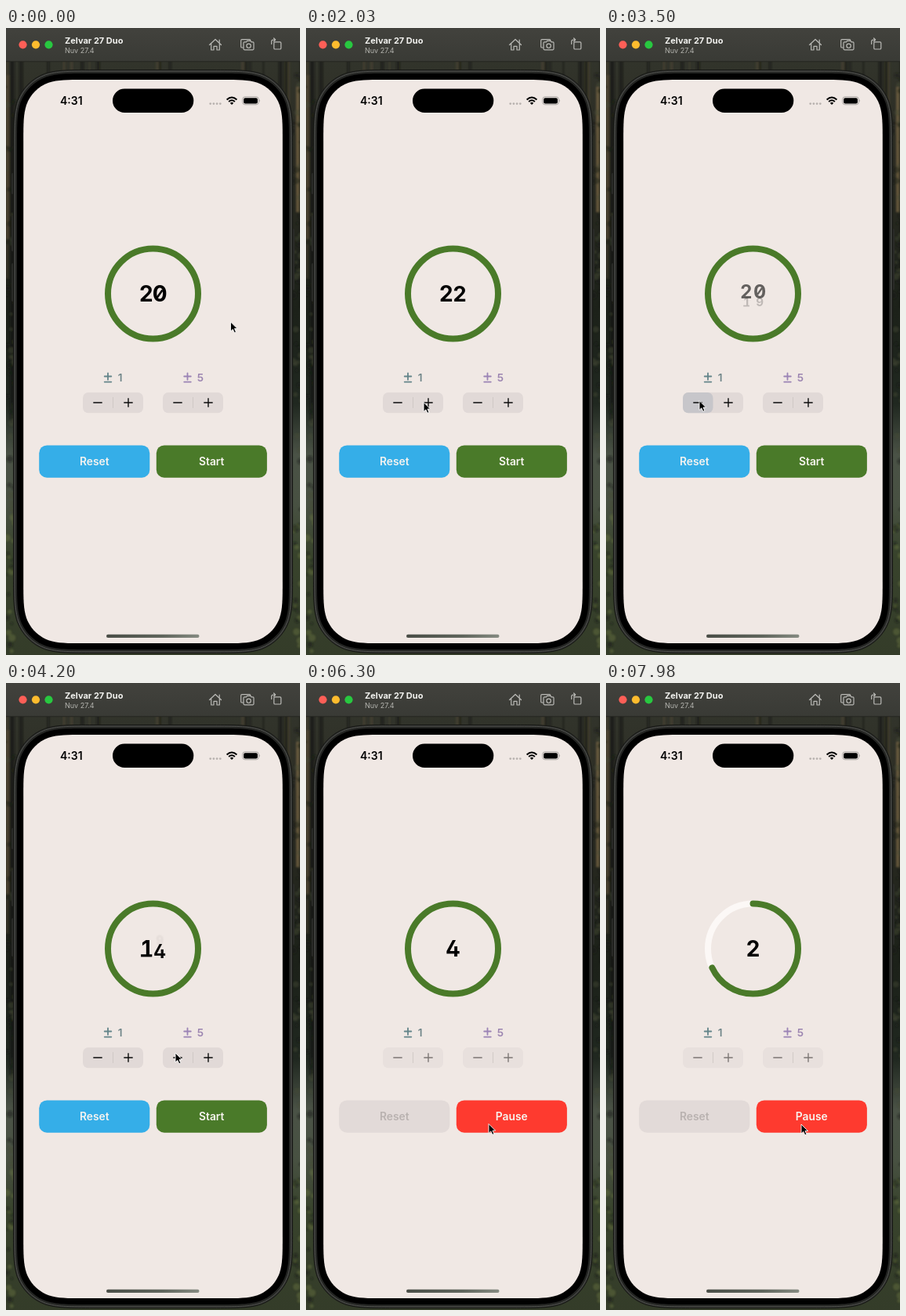
An HTML page that plays this animation: 375x800 px, repeating every 8 s.

```html
<!DOCTYPE html>
<html lang="en">
<head>
<meta charset="utf-8">
<title>Countdown</title>
<style>
  html, body { margin: 0; width: 100%; height: 100%; overflow: hidden; background: #24271c; }
  svg { display: block; width: 375px; height: 800px; }
  text { font-family: Inter, Roboto, sans-serif; }
  .digit { font-size: 28px; font-weight: 700; text-anchor: middle; font-feature-settings: "cv02"; }
  .label { font-size: 13.6px; font-weight: 600; text-anchor: middle; }
  .btn { font-size: 13.8px; font-weight: 600; text-anchor: middle; }
  .icon { fill: none; stroke: #babab6; stroke-width: 1.2; stroke-linejoin: round; stroke-linecap: round; }
</style>
</head>
<body>
<svg viewBox="0 0 375 800">
  <defs>
    <linearGradient id="forest" x2="0" y2="1">
      <stop offset="0" stop-color="#34372e"/>
      <stop offset=".2" stop-color="#2b2b22"/>
      <stop offset=".45" stop-color="#1c2119"/>
      <stop offset=".6" stop-color="#202820"/>
      <stop offset=".68" stop-color="#4a5246"/>
      <stop offset=".76" stop-color="#485142"/>
      <stop offset=".84" stop-color="#38432c"/>
      <stop offset="1" stop-color="#343c29"/>
    </linearGradient>
    <linearGradient id="bar" x2="0" y2="1">
      <stop offset="0" stop-color="#42423d"/><stop offset="1" stop-color="#393a35"/>
    </linearGradient>
    <linearGradient id="home">
      <stop offset="0" stop-color="#4a4e47"/><stop offset=".6" stop-color="#5f655c"/><stop offset="1" stop-color="#868b82"/>
    </linearGradient>
    <filter id="soft"><feGaussianBlur stdDeviation=".9"/></filter>
  </defs>

  <rect width="375" height="800" fill="url(#forest)"/>
  <g id="trees" filter="url(#soft)"></g>

  <!-- window bar -->
  <rect width="375" height="43" fill="url(#bar)"/>
  <rect y="42.4" width="375" height=".8" fill="#20211c"/>
  <circle cx="21.5" cy="21.3" r="5.1" fill="#fe5f57"/>
  <circle cx="38" cy="21.3" r="5.1" fill="#febc2e"/>
  <circle cx="54.5" cy="21.3" r="5.1" fill="#28c840"/>
  <text x="75" y="20" font-size="11" font-weight="700" fill="#f2f2ef">Zelvar 27 Duo</text>
  <text x="75" y="31.7" font-size="9" fill="#b4b4af">Nuv 27.4</text>
  <g class="icon">
    <path d="M259.5 21.5 L267 14.5 L274.5 21.5 M261.7 20 V28 H265 V23.3 H269 V28 H272.3 V20 M272.2 15 V18.5"/>
    <path d="M302.5 25 H301 Q299.7 25 299.7 23.7 V16 Q299.7 14.7 301 14.7 H310.5 Q311.8 14.7 311.8 16"/>
    <path d="M304.2 17.8 H306.4 L307.6 16.4 H311.8 L313 17.8 H314.8 Q316 17.8 316 19 V26.6 Q316 27.8 314.8 27.8 H304.2 Q303 27.8 303 26.6 V19 Q303 17.8 304.2 17.8 Z"/>
    <circle cx="309.6" cy="22.8" r="2.7"/>
    <rect x="341.8" y="17.8" width="9" height="9.2" rx="1.3"/>
    <path d="M338.7 20.5 V17.2 Q338.7 15 341 15 H343.2 M341.6 13 L343.6 15 L341.6 17"/>
  </g>

  <!-- device -->
  <g fill="#2a2b28">
    <rect x="7" y="185" width="4" height="27" rx="1.5"/>
    <rect x="7" y="239" width="4" height="46" rx="1.5"/>
    <rect x="7" y="300" width="4" height="49" rx="1.5"/>
    <rect x="364.5" y="256" width="3.5" height="78" rx="1.5"/>
  </g>
  <g id="device"></g>
  <rect x="136" y="77.5" width="103.3" height="30.5" rx="15.2"/>
  <text x="83.3" y="98" font-size="14" font-weight="600" text-anchor="middle">4:31</text>
  <g fill="#b7b1ae">
    <circle cx="260.7" cy="96.6" r="1.35"/><circle cx="264.9" cy="96.6" r="1.35"/>
    <circle cx="269.1" cy="96.6" r="1.35"/><circle cx="273.3" cy="96.6" r="1.35"/>
  </g>
  <g fill="none" stroke="#000" stroke-width="2">
    <path d="M281.6 91.5 Q288 85.6 294.4 91.5"/>
    <path d="M284.1 94 Q288 90.6 291.9 94"/>
  </g>
  <path d="M288 98 L285.8 95.7 Q288 94 290.2 95.7 Z"/>
  <rect x="301.7" y="87.8" width="20.6" height="10" rx="3.2" fill="none" stroke="#a29d9a" stroke-width=".9"/>
  <rect x="303.1" y="89.2" width="17.8" height="7.2" rx="2"/>
  <path d="M323.4 91 Q325 92.8 323.4 94.6 Z" fill="#a29d9a"/>
  <rect x="128" y="773.8" width="118.5" height="4.3" rx="2.1" fill="url(#home)"/>

  <!-- timer -->
  <circle cx="187.5" cy="339" r="57.5" fill="none" stroke="#fcf8f6" stroke-width="8"/>
  <circle id="ring" cx="187.5" cy="339" r="57.5" fill="none" stroke="#4a7a29" stroke-width="8"
    stroke-linecap="round" pathLength="1" transform="rotate(-90 187.5 339)"/>
  <g id="digits"></g>

  <g stroke-width="1.8" stroke-linecap="round">
    <path d="M125.7 444.5 H134.3 M130 440.3 V448.8 M125.7 451.6 H134.3" stroke="#64858a"/>
    <path d="M227.2 444.5 H235.8 M231.5 440.3 V448.8 M227.2 451.6 H235.8" stroke="#9b84b5"/>
  </g>
  <text class="label" x="145.7" y="451.2" fill="#6f8588">1</text>
  <text class="label" x="247.8" y="451.2" fill="#9b84b0">5</text>
  <g id="steppers"></g>

  <rect id="reset" x="42.2" y="532.4" width="141.1" height="41.3" rx="10"/>
  <text id="resetText" class="btn" x="112.8" y="558">Reset</text>
  <rect id="start" x="191.8" y="532.4" width="141.1" height="41.3" rx="10"/>
  <text id="startText" class="btn" x="262.2" y="558" fill="#f7f4ee"></text>

  <path id="cursor" d="M0 0 V12 L2.8 9.4 L4.8 13.8 L6.9 12.9 L5 8.6 H8.6 Z" stroke="#fff" stroke-width=".9" stroke-linejoin="round"/>
</svg>
<script>
const LOOP = 8000, START = 5890, TOTAL = 4, MID = 187.5, HALF = 8.6;
const $ = id => document.getElementById(id);
const clamp = v => Math.max(0, Math.min(1, v));
const mix = (a, b, p) => a + (b - a) * p;
const smooth = p => p * p * (3 - 2 * p);
const spring = ms => {
  const w = Math.max(0, ms) / 1000 * 2 * Math.PI / 0.55;
  return 1 - (1 + w) * Math.exp(-w);
};

// stepper presses: time, hold, change, stepper index
const taps = [
  [1080, 190, 1, 0], [1600, 130, 1, 0],
  [2590, 390, -1, 0], [3090, 130, -1, 0], [3420, 120, -1, 0],
  [3960, 130, -5, 1], [4500, 130, -5, 1], [5040, 130, -5, 1]
];
// cursor moves: begin, end, x, y
const moves = [
  [70, 420, 168, 466], [560, 700, 157, 478], [1900, 2380, 119, 475.5],
  [3560, 3870, 216, 472], [5540, 5850, 233, 562.5], [6950, 7560, 249, 563]
];

function scenery() {
  let seed = 11, out = '';
  const rnd = () => (seed = (seed * 16807) % 2147483647) / 2147483647;
  for (let i = 0; i < 24; i++) {
    const x = rnd() * 375, w = 1 + rnd() * 4;
    out += `<rect x="${x}" y="40" width="${w}" height="${180 + rnd() * 320}" fill="${i % 3 ? '#171a13' : '#4b4535'}" opacity=".6"/>`;
  }
  out += '<rect x="0" y="60" width="4" height="210" fill="#5b4f38" opacity=".55"/>' +
    '<rect x="370" y="75" width="4" height="160" fill="#7c6a48" opacity=".7"/>';
  for (let i = 0; i < 130; i++) {
    const x = (i % 2) * 365 + rnd() * 12, y = 60 + rnd() * 740;
    const light = y > 620 ? '#69743f' : '#474b38';
    out += `<circle cx="${x}" cy="${y}" r="${1.5 + rnd() * 3.5}" fill="${rnd() < .5 ? light : '#161c14'}" opacity=".45"/>`;
  }
  $('trees').innerHTML = out;
}

// rectangle with continuous-curvature corners, centred on the device
function squircle(w, h, r) {
  const corner = [[1.528, 0], [1.088, 0], [.868, 0], [.631, .075], [.373, .169], [.169, .373], [.075, .631], [0, .868], [0, 1.088], [0, 1.528]];
  const place = (sx, sy, flip) => {
    const pts = corner.map(([u, v]) => [MID + sx * (w / 2 - u * r), 425.5 + sy * (h / 2 - v * r)].map(n => n.toFixed(2)).join(' '));
    if (flip) pts.reverse();
    return `${pts[0]} C${pts.slice(1).join(' ')}`;
  };
  return `M${place(1, -1)} L${place(1, 1, true)} L${place(-1, 1)} L${place(-1, -1, true)} Z`;
}

function device() {
  const layer = (w, h, r, paint) => `<path d="${squircle(w, h, r)}" ${paint}/>`;
  $('device').innerHTML =
    layer(356, 744, 63.5, 'fill="#2f302e" stroke="#161714"') +
    layer(352.6, 740.6, 62, 'fill="#242523" stroke="#545552" stroke-width=".9"') +
    layer(347, 735, 59, 'fill="#000"') +
    layer(330.6, 719, 51, 'fill="#f0e8e4"');
}

function stepper(x, pressed, off) {
  const ink = off ? '#7d7775' : '#0c0c0c';
  const hot = pressed ? `<rect x="${pressed > 0 ? x + 38.5 : x}" y="465" width="38.5" height="26.3" rx="7" fill="#c7c6ca"/>` : '';
  const line = pressed ? '' : `<path d="M${x + 38.5} 471 v14" stroke="#cbc4c1" stroke-width=".8"/>`;
  return `<rect x="${x}" y="465" width="77" height="26.3" rx="7" fill="${off ? '#e8e0dd' : '#e1d9d7'}"/>${hot}${line}
    <path d="M${x + 13.3} 478 h11.4 M${x + 52.3} 478 h11.4 M${x + 58} 472.3 v11.4" stroke="${ink}" stroke-width="1.4"/>`;
}

function glyph(ch, x, dy, scale, alpha, blur) {
  if (ch === '' || alpha <= 0.01) return '';
  const extra = ch === '0' ? '<path d="M-3.4 4.8 L3.4 -4.8" stroke="#000" stroke-width="2.6"/>'
    : ch === '1' ? '<path d="M-6.8 8.6 H7.4" stroke="#000" stroke-width="3.2"/>' : '';
  const soft = blur > 0.05 ? ` style="filter:blur(${blur.toFixed(2)}px)"` : '';
  return `<g transform="translate(${x} ${339.2 + dy}) scale(${scale})" opacity="${alpha}"${soft}>
    <text class="digit" y="10.2">${ch}</text>${extra}</g>`;
}

// old digit leaves in one direction while the new one follows it in
function roll(from, to, x, p, dir) {
  if (from === to || p > 0.995) return glyph(to, x, 0, 1, 1, 0);
  return glyph(from, x, dir * 14 * p, 1 - 0.6 * p, Math.pow(1 - p, 2), 3 * Math.min(p, 0.5)) +
    glyph(to, x, -dir * 14 * (1 - p), 0.4 + 0.6 * p, clamp((p - 0.1) * 1.45), 3 * Math.max(0, 0.7 - p));
}

const split = n => [n > 9 ? String(Math.floor(n / 10)) : '', String(n % 10)];

function draw(t) {
  let value = 20, before = 20, last = 0, dir = 1;
  const press = [0, 0];
  for (const [at, hold, delta, which] of taps) {
    if (t < at) break;
    before = value;
    value += delta;
    last = at;
    dir = Math.sign(delta);
    if (t < at + hold) press[which] = dir;
  }
  const running = t >= START;
  const ticks = running ? Math.floor((t - START) / 1000) : 0;
  if (ticks) before = value = TOTAL - ticks;

  const p = spring(t - last), [a, b] = split(before), [c, d] = split(value);
  const spot = s => s ? MID + HALF : MID;
  const x = mix(spot(a), spot(c), p);
  $('digits').innerHTML = roll(a, c, x - 2 * HALF, p, dir) + roll(b, d, x, p, dir);

  const tickAge = t - START - ticks * 1000;
  const left = ticks ? 1 - (ticks - 1 + spring(tickAge)) / TOTAL : 1;
  $('ring').setAttribute('stroke-dasharray', left < 1 ? `${left} 2` : 'none');

  $('steppers').innerHTML = stepper(98, press[0], running) + stepper(200, press[1], running);
  $('reset').setAttribute('fill', running ? '#e2dad8' : '#35aee8');
  $('resetText').setAttribute('fill', running ? '#b9b2b0' : '#f5f3f0');
  $('start').setAttribute('fill', running ? '#fe3a2f' : '#4a7a29');
  $('startText').textContent = running ? 'Pause' : 'Start';

  let cx = 286.5, cy = 375;
  for (const [from, to, mx, my] of moves) {
    const q = smooth(clamp((t - from) / (to - from)));
    cx = mix(cx, mx, q);
    cy = mix(cy, my, q);
  }
  $('cursor').setAttribute('transform', `translate(${cx} ${cy})`);
}

scenery();
device();
const begin = performance.now();
function frame() {
  draw((performance.now() - begin) % LOOP);
  requestAnimationFrame(frame);
}
frame();
</script>
</body>
</html>
```
